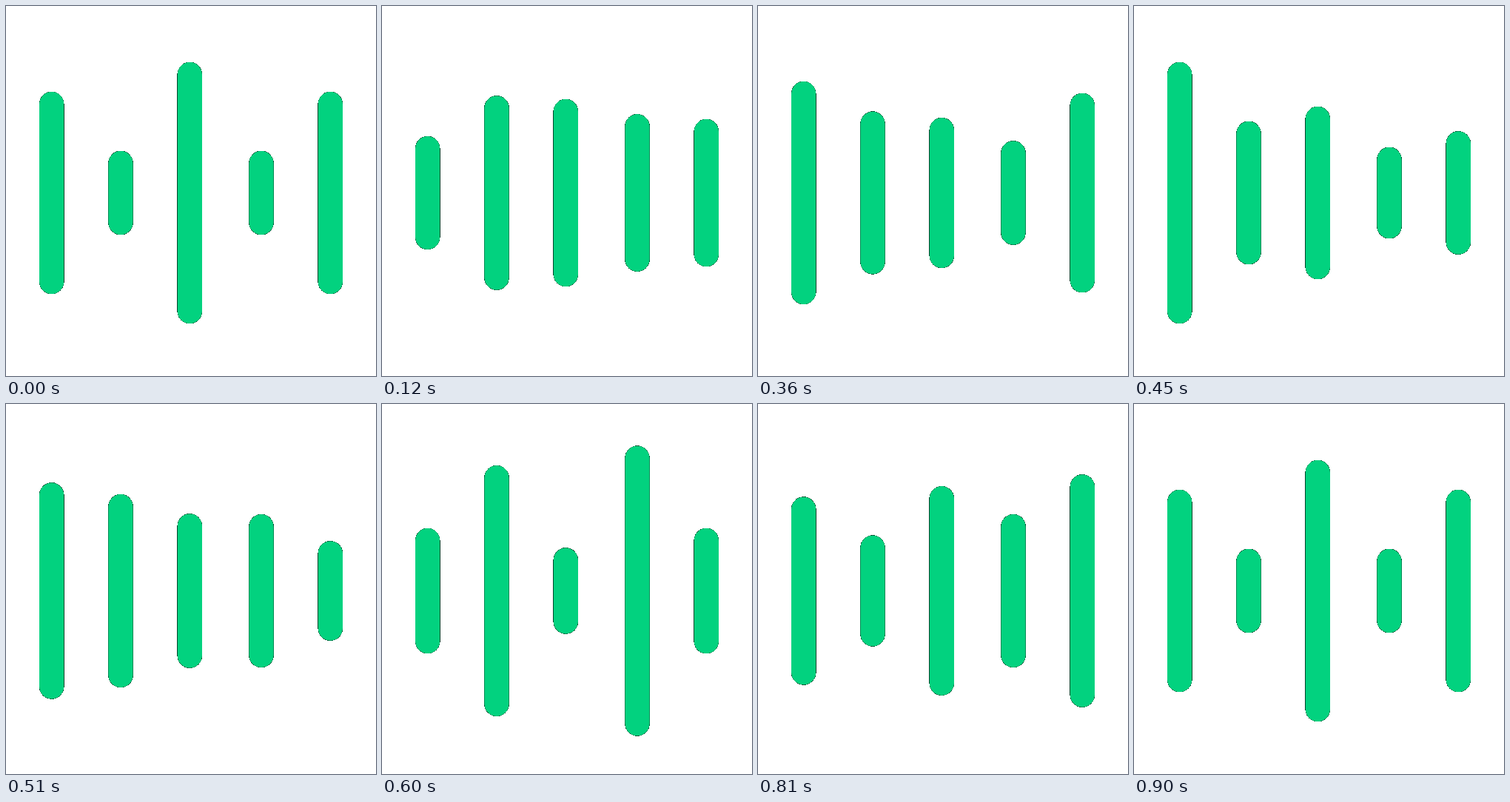
Write an HTML page with a canvas that moves like this. It is 500 by 500 pixels and loops after 0.93 s.

```html
<!DOCTYPE html>
<html lang="en">
<head>
<meta charset="utf-8">
<title>Sound bars</title>
<style>
html, body { margin: 0; width: 100%; height: 100%; overflow: hidden; background: #fff; }
canvas { display: block; }
</style>
</head>
<body>
<canvas id="stage" width="500" height="500"></canvas>
<script>
const SIZE = 500, STEP = 30, LAST = 30;
const CENTER = 252.5, RADIUS = 50 / 3;
const GREEN = [2, 210, 127];
const EDGE_CUTOFF = 64;

const ctx = document.getElementById('stage').getContext('2d', { willReadFrequently: true });

// rest: reach above the center at both ends of the loop; turns: [step, reach] in between.
const bars = [
  { x: 185 / 3, rest: 120, turns: [[5.85, 44], [15, 160], [20, 68]] },
  { x: 155, rest: 40, turns: [[6, 137], [15, 80], [19.2, 154]] },
  { x: 745 / 3, rest: 160, turns: [[8, 60], [15, 100], [21.75, 32]] },
  { x: 345, rest: 40, turns: [[7, 120], [14, 40], [22, 200]] },
  { x: 1315 / 3, rest: 120, turns: [[4, 83], [9, 142], [17.5, 50], [25.75, 145]] }
];

// Cubic Bezier ease with control points (.42, 0) and (.58, 1).
function easeInOut(x) {
  let lo = 0, hi = 1;
  for (let i = 0; i < 24; i++) {
    const u = (lo + hi) / 2;
    if (1.26 * u - 0.78 * u * u + 0.52 * u ** 3 < x) lo = u;
    else hi = u;
  }
  return lo * lo * (3 - 2 * lo);
}

function reachAt({ rest, turns }, step) {
  const keys = [[0, rest], ...turns, [LAST, rest]];
  const next = Math.max(1, keys.findIndex(key => key[0] >= step));
  const [t0, r0] = keys[next - 1];
  const [t1, r1] = keys[next];
  return r0 + (r1 - r0) * easeInOut((step - t0) / (t1 - t0));
}

function drawBar(x, reach) {
  const half = reach + RADIUS;
  ctx.beginPath();
  ctx.roundRect(x - RADIUS, CENTER - half, 2 * RADIUS, 2 * half, RADIUS);
  ctx.fill();
}

// Hard-edged cutout: partly covered pixels darken, faint ones vanish.
function hardenEdges() {
  const image = ctx.getImageData(0, 0, SIZE, SIZE);
  const px = image.data;
  for (let i = 0; i < px.length; i += 4) {
    const alpha = px[i + 3];
    for (let c = 0; c < 3; c++) {
      px[i + c] = alpha < EDGE_CUTOFF ? 255 : GREEN[c] * alpha / 255;
    }
    px[i + 3] = 255;
  }
  ctx.putImageData(image, 0, 0);
}

function render(step) {
  ctx.clearRect(0, 0, SIZE, SIZE);
  for (const bar of bars) drawBar(bar.x, reachAt(bar, step));
  hardenEdges();
}

const start = performance.now();
let shown = -1;
function loop() {
  const step = Math.floor((performance.now() - start) / STEP) % (LAST + 1);
  if (step !== shown) render(shown = step);
  requestAnimationFrame(loop);
}
loop();
</script>
</body>
</html>
```
